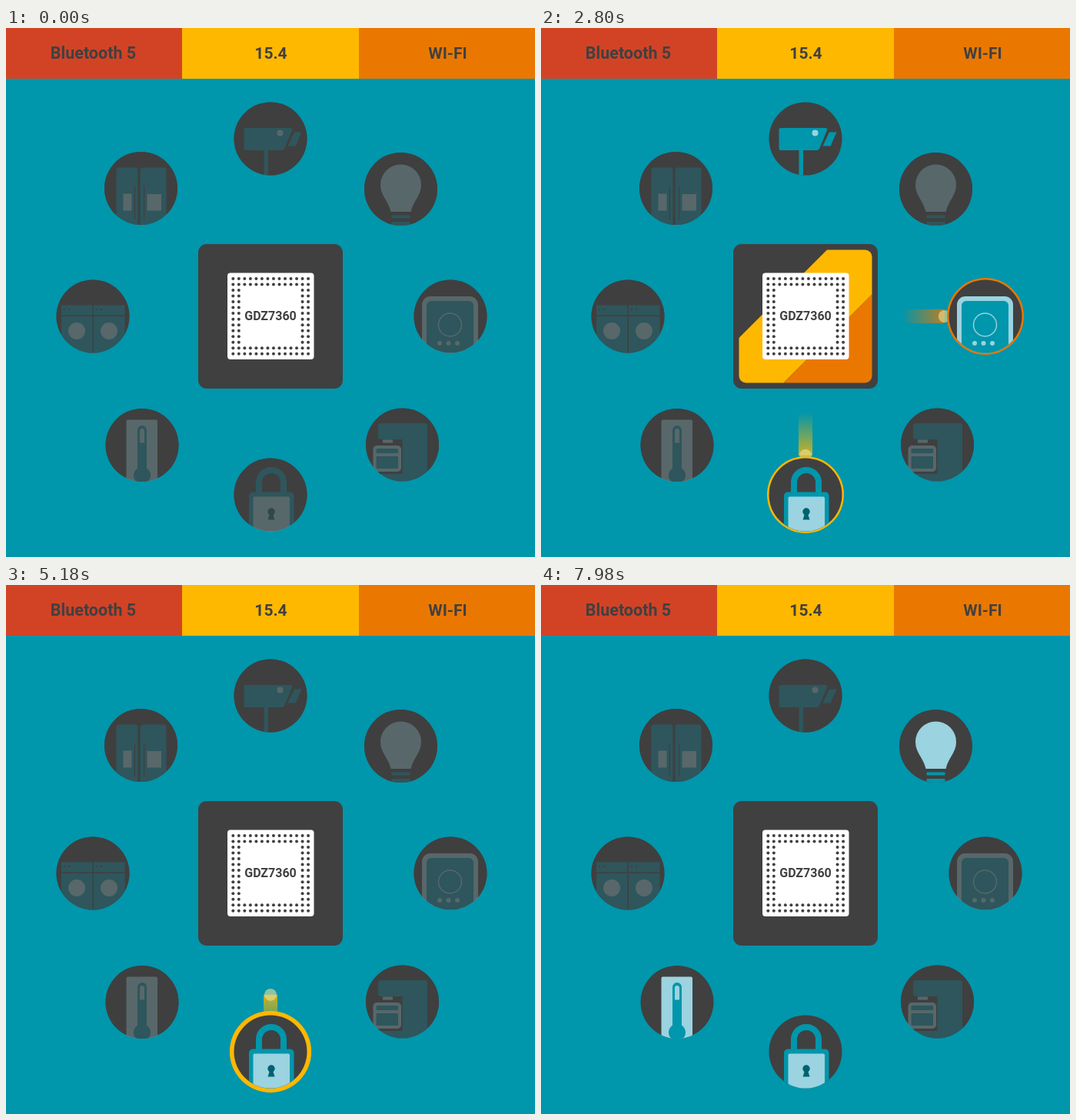
These frames come from a looping animation (688x688 px, 8000 ms). An HTML page with a canvas:

```html
<!DOCTYPE html>
<html lang="en">
<head>
<meta charset="utf-8">
<title>Connected devices</title>
<style>
  html, body { margin: 0; width: 100%; height: 100%; overflow: hidden; background: #0096ac; }
  canvas { display: block; width: 688px; height: 688px; }
</style>
</head>
<body>
<canvas id="stage" width="688" height="688"></canvas>
<script>
const ctx = document.getElementById('stage').getContext('2d');
const LOOP = 8000, STEP = 70;
const TEAL = '#0096ac', DARK = '#404040', LIGHT = '#9bd3e0';
const RED = '#d24326', YELLOW = '#ffb800', ORANGE = '#ea7800';
const CHIP = { x: 344, y: 375 };
const DISC = 47.5, RING = 7.5, BEAM = 56;

const clamp = v => Math.max(0, Math.min(1, v));
const ramp = (t, from, to) => clamp((t - from) / (to - from));
// Each span is [fade-in start, fade-in end, fade-out start, fade-out end].
const level = (t, spans = []) => spans.reduce(
  (sum, [a, b, c, d]) => Math.max(sum, ramp(t, a, b) - ramp(t, c, d)), 0);

function box(color, x, y, w, h, r = 0) {
  ctx.fillStyle = color;
  ctx.beginPath();
  ctx.roundRect(x, y, w, h, r);
  ctx.fill();
}
function dot(color, x, y, r) {
  ctx.fillStyle = color;
  ctx.beginPath();
  ctx.arc(x, y, r, 0, Math.PI * 2);
  ctx.fill();
}
function shape(color, path) {
  ctx.fillStyle = color;
  ctx.fill(new Path2D(path));
}
function line(color, width, path) {
  ctx.strokeStyle = color;
  ctx.lineWidth = width;
  ctx.stroke(new Path2D(path));
}
function label(text, x, y, size) {
  ctx.fillStyle = DARK;
  ctx.font = `bold ${size}px Roboto, sans-serif`;
  ctx.textAlign = 'center';
  ctx.fillText(text, x, y);
}

function camera() {
  shape(TEAL, 'M312 130H370Q373 130 372 133L362 157Q361 159 359 159H312Q309.500 159 309.500 156.500V132.500Q309.500 130 312 130Z');
  shape(TEAL, 'M375 135.500H384.500L376.500 153.500H366.500Z');
  box(TEAL, 335.5, 158, 5.5, 36);
  dot(LIGHT, 356.5, 136.5, 4);
}
function bulb() {
  shape(LIGHT, 'M500.500 239C497 224 487 218 487 204A26.500 26.500 0 0 1 540 204C540 218 530 224 526.500 239Z');
  box(TEAL, 501.5, 243.5, 24, 4, 1);
  box(TEAL, 501.5, 252, 24, 5, 1);
}
function thermostat() {
  box(LIGHT, 541, 349, 73, 90, 11);
  box(TEAL, 547, 355, 61, 84, 6);
  line(LIGHT, 1.4, 'M562.500 386a15 15 0 1 0 30 0a15 15 0 1 0 -30 0');
  for (const x of [564, 575.5, 587]) dot(LIGHT, x, 410, 3);
}
function coffeeMaker() {
  box(TEAL, 484, 514, 64, 21, 4);
  box(TEAL, 515.5, 516, 32.5, 76);
  box(TEAL, 470, 580, 60, 14);
  box(LIGHT, 490, 535.5, 13, 4);
  box(LIGHT, 477.5, 543, 36.5, 34, 5);
  box(TEAL, 481.5, 547, 28.5, 6, 1);
  box(TEAL, 481.5, 557, 28.5, 16, 1);
}
function padlock() {
  line(TEAL, 8, 'M329 608V591A16 16 0 0 1 361 591V608');
  box(TEAL, 316, 603.5, 58.5, 60, 5);
  box(LIGHT, 321.5, 609.5, 47.5, 60, 2);
  dot('#006170', 345, 629, 4.7);
  shape('#006170', 'M343.500 630H346.500L349.500 639.500H340.500Z');
}
function thermometer() {
  box(LIGHT, 156.5, 509.5, 40.5, 90, 2);
  box(TEAL, 171, 517, 12, 62, 6);
  dot(TEAL, 177, 582, 11);
  box(LIGHT, 174, 521, 6, 18.5, [3, 3, 0, 0]);
}
function washers() {
  for (const x of [72, 114]) {
    box(TEAL, x, 360.5, 40.5, 13);
    box(TEAL, x, 375, 40.5, 50);
    dot(DARK, x + 4, 366, 1.2);
    dot(DARK, x + 10, 366, 1.2);
    dot(LIGHT, x + 20, 394, 11);
  }
}
function fridge() {
  box(TEAL, 143.5, 181.5, 28, 80, 4);
  box(TEAL, 174.5, 181.5, 34, 80, 4);
  box(LIGHT, 152.5, 215.5, 11, 22);
  box(LIGHT, 183.5, 216, 18.5, 21.5);
  box(DARK, 166.8, 206, 1.2, 43);
  box(DARK, 179, 206, 1.2, 43);
}

// Beam: [start, end, first head distance, last head distance, direction, bend].
const roundTrip = (start, nearOut, nearIn, bend) => [
  [start + 140, start + 716, nearOut, 242, 1, 1],
  [start + 716, start + 1546, 190, nearIn, -1, bend]
];
const ringTrip = start => [[start + 410, start + 650, start + 1540, start + 1820]];

const devices = [
  { x: 344, y: 144, icon: camera, color: RED,
    lit: [[0, 210, 4480, 4690]], ring: [[450, 690, 1610, 1890]],
    beams: [[560, 1400, 190, 36, -1, 1]] },
  { x: 513.5, y: 209.5, icon: bulb, color: RED,
    lit: [[6440, 6650, 9000, 9001]], ring: ringTrip(6160),
    beams: roundTrip(6160, 118, 72, 0.78) },
  { x: 578, y: 375, icon: thermostat, color: ORANGE,
    lit: [[2590, 2800, 4480, 4690]], ring: ringTrip(2310),
    beams: roundTrip(2310, 86, 36, 1) },
  { x: 515.5, y: 542, icon: coffeeMaker },
  { x: 344, y: 607, icon: padlock, color: YELLOW,
    lit: [[2590, 2800, 4480, 4690], [4970, 5180, 9000, 9001]],
    ring: [...ringTrip(2310), [5000, 5240, 6160, 6440]],
    beams: [...roundTrip(2310, 86, 36, 1), [5005, 5845, 190, 36, -1, 1]] },
  { x: 177, y: 542.5, icon: thermometer, color: YELLOW,
    lit: [[6440, 6650, 9000, 9001]], ring: ringTrip(6160),
    beams: roundTrip(6160, 118, 72, 0.78) },
  { x: 113, y: 375, icon: washers },
  { x: 175.5, y: 208.5, icon: fridge }
];

const segments = [
  { color: RED, path: 'M250 281H379.500L250 410.500Z',
    lit: [[960, 1090, 2030, 2170], [6080, 6210, 7840, 7980]] },
  { color: YELLOW, path: 'M379.500 281H438V339L315.500 461.500L308 469H250V410.500Z',
    lit: [[2230, 2360, 3990, 4130], [5420, 5560, 7840, 7980]] },
  { color: ORANGE, path: 'M438 339V469H308Z', lit: [[2230, 2360, 3990, 4130]] }
];

function drawBeams(device, t) {
  for (const [start, end, from, to, dir, bend] of device.beams || []) {
    if (t < start || t >= end) continue;
    const head = from + (to - from) * Math.pow(ramp(t, start, end), bend);
    const tail = head - dir * BEAM;
    ctx.save();
    ctx.translate(CHIP.x, CHIP.y);
    ctx.rotate(Math.atan2(device.y - CHIP.y, device.x - CHIP.x));
    const fade = ctx.createLinearGradient(tail, 0, head, 0);
    fade.addColorStop(0, device.color + '00');
    fade.addColorStop(1, device.color + 'c8');
    box(fade, Math.min(head, tail), -9, BEAM, 18);
    dot('rgba(240,225,150,0.6)', head, 0, 8);
    ctx.restore();
  }
}

function drawDevice(device, t) {
  const { x, y, icon, color, lit, ring } = device;
  const grow = level(t, ring);
  if (grow > 0) dot(color, x, y, DISC + RING * grow);
  dot(DARK, x, y, DISC);
  ctx.save();
  ctx.beginPath();
  ctx.arc(x, y, DISC, 0, Math.PI * 2);
  ctx.clip();
  icon();
  ctx.globalAlpha = 0.73 * (1 - level(t, lit));
  box(DARK, x - 50, y - 50, 100, 100);
  ctx.restore();
}

function drawChip(t) {
  box(DARK, 250, 281, 188, 188, 11);
  ctx.save();
  ctx.beginPath();
  ctx.roundRect(257.5, 288.5, 173, 173, 9);
  ctx.clip();
  for (const { color, path, lit } of segments) {
    ctx.globalAlpha = level(t, lit);
    shape(color, path);
  }
  ctx.restore();
  box('#fff', 288, 318.5, 112.5, 112.5, 4);
  const inner = i => i > 1 && i < 12;
  for (let row = 0; row < 14; row++)
    for (let col = 0; col < 14; col++)
      if (!inner(row) || !inner(col)) dot(DARK, 295.3 + col * 7.52, 326 + row * 7.52, 2);
  label('GDZ7360', 344, 380, 16);
}

function drawHeader() {
  box(RED, 0, 0, 229, 66);
  box(YELLOW, 229, 0, 230, 66);
  box(ORANGE, 459, 0, 229, 66);
  label('Bluetooth 5', 113.5, 40, 21.5);
  label('15.4', 344.5, 40, 21);
  label('WI-FI', 574.5, 40, 21);
}

function draw(now) {
  const t = Math.floor((now % LOOP) / STEP) * STEP;
  box(TEAL, 0, 0, 688, 688);
  drawHeader();
  devices.forEach(d => drawBeams(d, t));
  devices.forEach(d => drawDevice(d, t));
  drawChip(t);
}

let origin;
function tick(now) {
  origin ??= now;
  draw(now - origin);
  requestAnimationFrame(tick);
}
draw(0);
requestAnimationFrame(tick);
</script>
</body>
</html>
```
